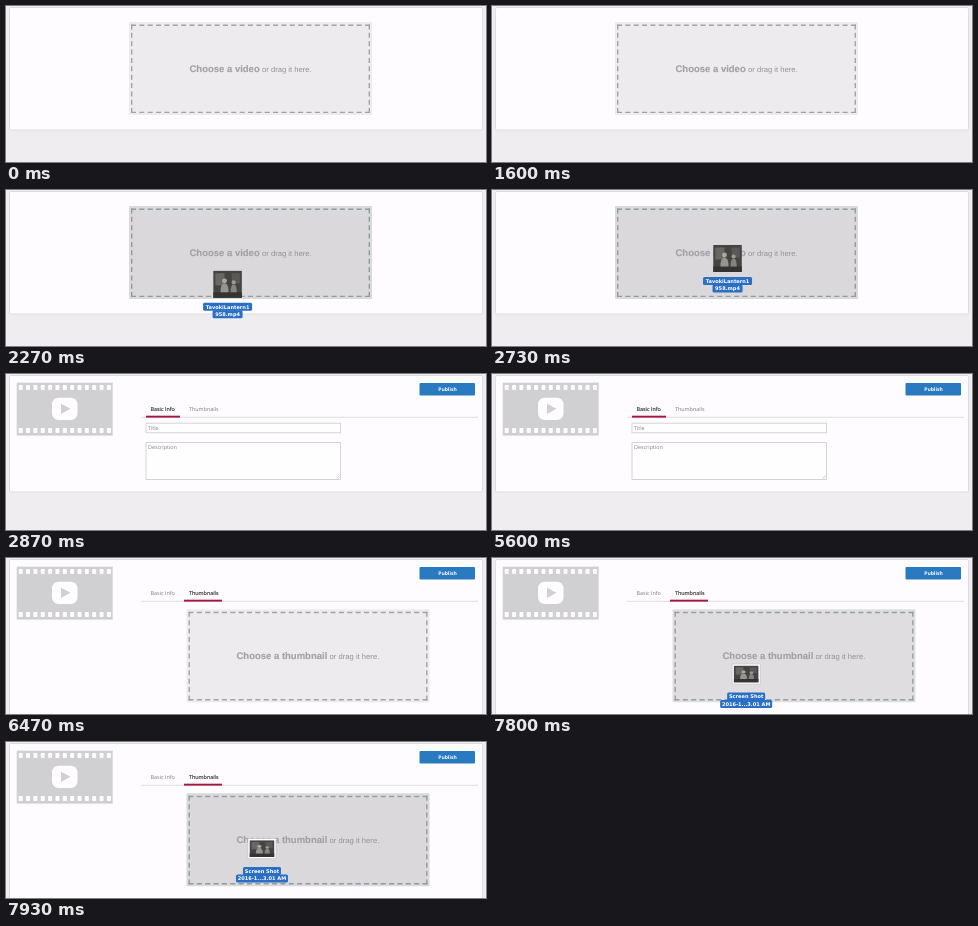
These frames come from a looping animation (480 px wide and 156 px high, 8000 ms). An HTML page:

```html
<!DOCTYPE html>
<html lang="en">
<head>
<meta charset="utf-8">
<title>Video upload</title>
<style>
  html, body { margin: 0; width: 100%; height: 100%; overflow: hidden; background: #efedf0; }
  svg { display: block; width: 100%; height: 100%; }
  text { text-rendering: geometricPrecision; }
  .ui { font: 5.4px "Open Sans", sans-serif; fill: #858488; }
  .publish { font: 700 5px "Open Sans", sans-serif; fill: #fff; text-anchor: middle; }
  .choose { font: 700 9.5px "Liberation Sans", Arial, sans-serif; fill: #a3a1a4; stroke: #a3a1a4; stroke-width: .15; }
  .drag { font: 7.65px "Liberation Sans", Arial, sans-serif; fill: #939195; }
  .label { font: 700 5.05px "DejaVu Sans", sans-serif; fill: #fff; text-anchor: middle; }
  .field { fill: #fefdff; stroke: #cbcacd; stroke-width: .8; }
</style>
</head>
<body>
<svg id="stage" viewBox="0 0 480 156" xmlns="http://www.w3.org/2000/svg"></svg>
<script>
const LOOP = 8000;
const DROP_VIDEO = 2840, OPEN_THUMBS = 6200;
const VIDEO_OVER = 2150, THUMB_OVER = 7690;
const stage = document.getElementById('stage');

function add(parent, tag, attrs = {}, text) {
  const el = document.createElementNS('http://www.w3.org/2000/svg', tag);
  for (const key in attrs) el.setAttribute(key, attrs[key]);
  if (text) el.textContent = text;
  parent.appendChild(el);
  return el;
}
const group = (parent = stage) => add(parent, 'g');
const rect = (parent, x, y, width, height, attrs) =>
  add(parent, 'rect', { x, y, width, height, ...attrs });
const label = (parent, x, y, cls, text) => add(parent, 'text', { x, y, class: cls }, text);

const clamp = v => Math.max(0, Math.min(1, v));
const show = (el, on) => el.setAttribute('display', on ? 'inline' : 'none');
const mix = (a, b, p) => `rgb(${a.map((v, i) => Math.round(v + (b[i] - v) * p))})`;

// A dashed side that begins and ends with a whole dash.
function dashedSide(parent, x, y, dx, dy) {
  const length = Math.abs(dx + dy), dash = 5;
  const gap = (length - dash) / Math.round((length - dash) / 8.5) - dash;
  add(parent, 'path', { d: `M${x} ${y}l${dx} ${dy}`, 'stroke-dasharray': `${dash} ${gap}` });
}

function dropZone(parent, x, y, title, titleX, dragX) {
  const box = rect(parent, x, y, 243, 93, { rx: 1 });
  const dashes = add(parent, 'g', { fill: 'none', 'stroke-width': 1.4 });
  const w = 239, h = 88.6, left = x + 2, top = y + 2.5;
  for (const side of [top + .7, top + h - .7]) dashedSide(dashes, left, side, w, 0);
  for (const side of [left + .7, left + w - .7]) dashedSide(dashes, side, top, 0, h);
  label(parent, titleX, y + 49.7, 'choose', title);
  label(parent, dragX, y + 49.7, 'drag', 'or drag it here.');
  return p => {
    box.setAttribute('fill', mix([237, 235, 238], [218, 216, 219], p));
    dashes.setAttribute('stroke', mix([164, 162, 165], [142, 158, 160], p));
  };
}

function filmIcon(parent) {
  rect(parent, 10.7, 8.6, 96, 53, { fill: '#d0cfd1' });
  for (let i = 0; i < 13; i++)
    for (const y of [11, 54])
      rect(parent, 12.7 + i * 7.35, y, 4, 5, { rx: .8, fill: '#fefcff' });
  rect(parent, 46, 23.7, 25.5, 22.3, { rx: 6.5, fill: '#fefcff' });
  add(parent, 'path', { d: 'M55 29.7L64.5 34.8L55 39.9Z', fill: '#d0cfd1' });
}

// Old black and white picture in plain shapes, centred on 0,0.
function photo(parent, w, h) {
  const g = add(parent, 'g', { transform: `scale(${w / 28} ${h / 27})` });
  rect(g, -14, -13.5, 28, 27, { fill: '#454442' });
  rect(g, -12, -11, 9, 12, { fill: '#696762' });
  rect(g, 4, -11, 8, 10, { fill: '#5b5955' });
  rect(g, -14, 8, 28, 5.5, { fill: '#343332' });
  add(g, 'path', { d: 'M-7 8Q-7 -1 -3 -1Q1 -1 1 8Z', fill: '#96948e' });
  add(g, 'circle', { cx: -3, cy: -3.5, r: 2.4, fill: '#aaa8a2' });
  add(g, 'path', { d: 'M3 8Q3 0 6 0Q9 0 9 8Z', fill: '#85837e' });
  add(g, 'circle', { cx: 6, cy: -2, r: 2, fill: '#9e9c96' });
}

function fileLabel(parent, y, lines, widths) {
  lines.forEach((text, i) => {
    rect(parent, -widths[i] / 2, y + i * 7.5, widths[i], 8, { rx: 1.5, fill: '#2a6fc4' });
  });
  lines.forEach((text, i) => label(parent, 0, y + 5.7 + i * 7.5, 'label', text));
}

// Card shared by all screens
const card = rect(stage, 3.5, 1.5, 473, 122.5, { rx: 1.5, fill: '#fefcff', stroke: '#dddbdf' });

// Video picker
const picker = group();
const videoZone = dropZone(picker, 123, 16, 'Choose a video', 183.5, 256);
const videoFile = group(picker);
photo(videoFile, 28.5, 27);
fileLabel(videoFile, 18.5, ['TavokiLantern1', '958.mp4'], [49, 30]);

// Editor
const editor = group();
filmIcon(editor);
rect(editor, 413.5, 9, 55.5, 12.5, { rx: 1, fill: '#2a7ac1' });
label(editor, 441.5, 17.2, 'publish', 'Publish');
rect(editor, 135, 42.8, 337, .8, { fill: '#d6d5d8' });
const underline = rect(editor, 140, 41.7, 34, 1.9, { fill: '#a51540' });
const tabs = [
  label(editor, 144.5, 36.5, 'ui', 'Basic Info'),
  label(editor, 183, 36.5, 'ui', 'Thumbnails')
];

const form = group(editor);
rect(form, 140, 49.2, 194.5, 9.6, { class: 'field' });
label(form, 142, 56, 'ui', 'Title');
rect(form, 140, 68.5, 194.5, 37, { class: 'field' });
label(form, 142, 75.4, 'ui', 'Description');
add(form, 'path', { d: 'M330.5 104.5l3-3M332.3 104.5l1.2-1.2', stroke: '#aaa', 'stroke-width': .5 });

const thumbs = group(editor);
const thumbZone = dropZone(thumbs, 180.5, 51.3, 'Choose a thumbnail', 230.5, 323.6);
const thumbFile = group(thumbs);
rect(thumbFile, -14, -10, 28, 20, { fill: '#fff', stroke: '#bbb', 'stroke-width': .5 });
photo(thumbFile, 24.5, 16.5);
fileLabel(thumbFile, 18.4, ['Screen Shot', '2016-1...3.01 AM'], [38, 52]);

function render(t) {
  const picking = t < DROP_VIDEO, onThumbs = t >= OPEN_THUMBS;
  show(picker, picking);
  show(editor, !picking);
  show(form, !onThumbs);
  show(thumbs, onThumbs);
  card.setAttribute('height', picking ? 122.5 : onThumbs ? 200 : 116.5);

  underline.setAttribute('x', onThumbs ? 178 : 140);
  underline.setAttribute('width', onThumbs ? 38 : 34);
  tabs.forEach((tab, i) => {
    const active = onThumbs === (i === 1);
    tab.style.fill = active ? '#353438' : '#7b7a7e';
    tab.style.stroke = active ? '#353438' : 'none';
    tab.style.strokeWidth = .15;
  });

  // The dragged video slows down as it nears the middle.
  const rest = Math.exp((2270 - t) / 174);
  show(videoFile, t >= 2050);
  videoFile.setAttribute('transform', `translate(${236.6 - 15.1 * rest} ${66.5 + 28 * rest})`);
  videoZone(clamp((t - VIDEO_OVER) / 110));

  const left = (1 - clamp((t - 7570) / 380)) ** 2;
  show(thumbFile, t >= 7570);
  thumbFile.setAttribute('transform', `translate(${256 - 12 * left} ${106.5 + 62 * left})`);
  thumbZone(clamp((t - THUMB_OVER) / 150));
}

function tick() {
  render(performance.now() % LOOP);
  requestAnimationFrame(tick);
}
tick();
</script>
</body>
</html>
```
